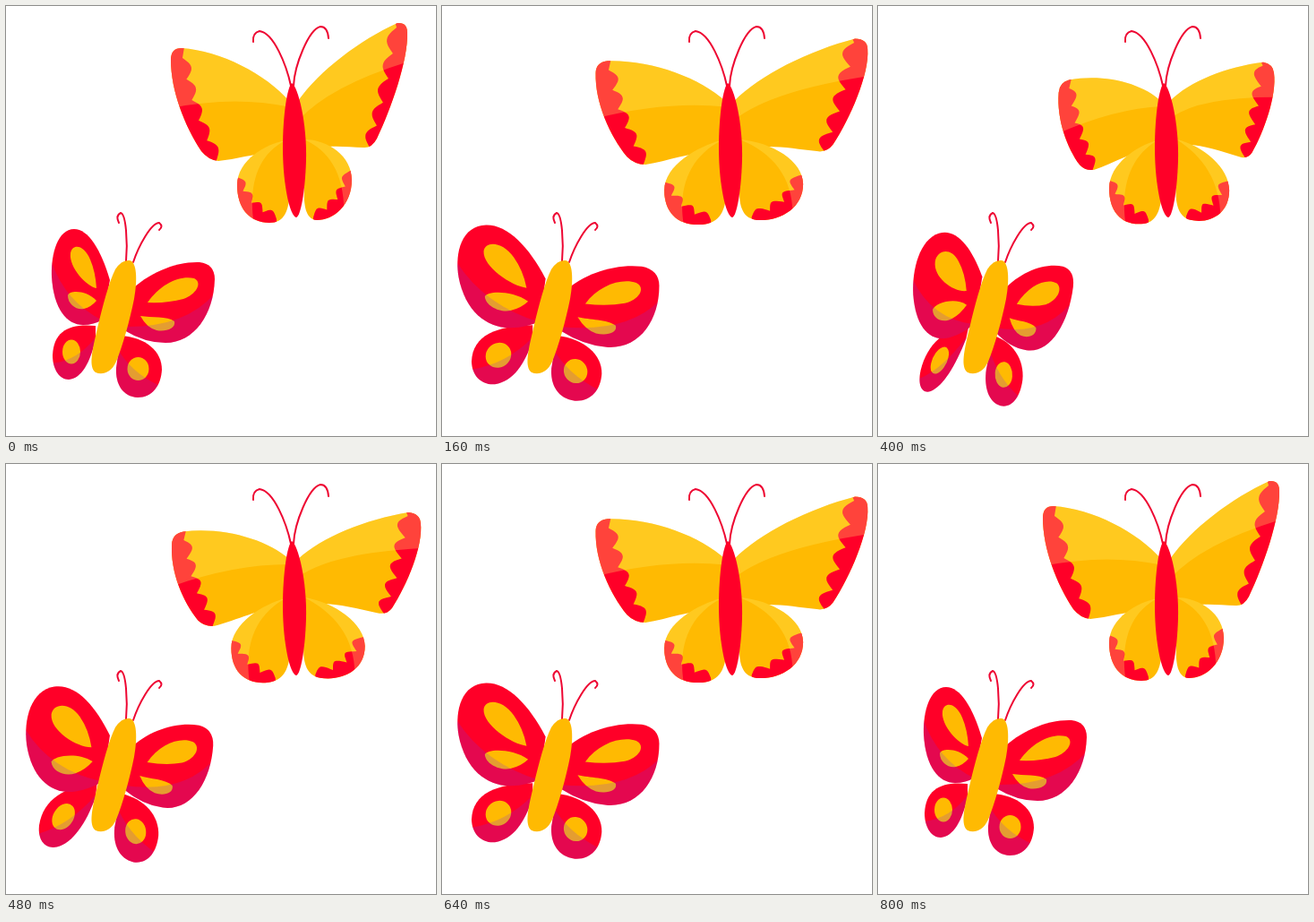
Write an HTML page with a canvas that moves like this. It is 480 px wide and 480 px high and loops after 0.84 s.

```html
<!DOCTYPE html>
<html lang="en">
<head>
<meta charset="utf-8">
<title>Butterflies</title>
<style>
  html, body { margin: 0; height: 100%; overflow: hidden; background: #fff; }
  canvas { display: block; }
</style>
</head>
<body>
<canvas id="stage" width="480" height="480"></canvas>
<script>
const ctx = document.getElementById('stage').getContext('2d');
const YELLOW = '#ffba02', RED = '#ff0028';
const LIGHT = 'rgba(255,240,110,.28)', SHADE = 'rgba(120,40,235,.2)';
const LOOP = 840, STEP = 40, TURN = 400;

// Row of rounded bumps along a quadratic curve; the sign of depth picks the side.
function scallops([x0, y0], [x1, y1], [x2, y2], count, depth) {
  const steps = count * 12;
  let path = '';
  for (let i = 0; i <= steps; i++) {
    const t = i / steps, s = 1 - t;
    const dx = s * (x1 - x0) + t * (x2 - x1), dy = s * (y1 - y0) + t * (y2 - y1);
    const out = depth * Math.abs(Math.sin(Math.PI * count * t)) / Math.hypot(dx, dy);
    const x = s * s * x0 + 2 * s * t * x1 + t * t * x2 + dy * out;
    const y = s * s * y0 + 2 * s * t * y1 + t * t * y2 - dx * out;
    path += `L${x.toFixed(1)} ${y.toFixed(1)}`;
  }
  return path;
}

const oval = (x, y, rx, ry) => `M${x - rx} ${y}a${rx} ${ry} 0 1 1 ${2 * rx} 0a${rx} ${ry} 0 1 1 ${-2 * rx} 0`;

// A wing deforms about its hinge. Both lists are changes to the matrix a, b, c, d:
// droop grows steadily to the turn, spread swells and fades on the way.
const wing = (color, hinge, droop, spread, outline, layers) => ({
  color, hinge, droop, spread,
  outline: new Path2D(outline),
  layers: layers.map(([fill, d]) => [fill, new Path2D(d)])
});

const wings = [
  wing(YELLOW, [315, 110], [-.11, -.23, -.065, -.13], [.155, 0, 0, 0],
    'M316 106C290 76 240 50 196 47Q184 47 184 60C184 95 200 135 218 162Q226 172 237 173C262 171 285 161 314 166Z',
    [[RED, 'M170 40H200' + scallops([197, 58], [206, 118], [235, 172], 5, 8) + 'V185H170Z'],
     [LIGHT, 'M170 117Q250 98 318 113V30H170Z']]),
  wing(YELLOW, [325, 105], [0, .26, .08, -.17], [.25, 0, 0, 0],
    'M326 106C350 72 395 38 437 19Q448 18 448 30C449 60 430 115 414 148Q408 159 399 158C375 157 350 153 328 166Z',
    [[RED, 'M460 10H432' + scallops([436, 24], [427, 98], [406, 158], 5, -9) + 'V175H460Z'],
     [LIGHT, 'M326 128Q363 87 460 59V10H326Z']]),
  wing(YELLOW, [312, 155], [0, -.07, 0, 0], [.19, -.08, 0, 0],
    'M312 150C290 154 258 172 258 200C258 226 272 242 294 242C310 242 316 230 317 205Z',
    [[RED, 'M250 188' + scallops([258, 191], [268, 225], [302, 238], 4, 7) + 'V250H250Z'],
     [LIGHT, 'M312 150C280 166 270 202 277 245H240V150Z']]),
  wing(YELLOW, [335, 155], [.12, .26, 0, -.04], [.3, 0, 0, 0],
    'M333 149C360 149 386 168 386 194C386 222 366 239 347 239C334 238 332 222 333 200Z',
    [[RED, 'M395 182' + scallops([384, 184], [377, 222], [343, 236], 4, -7) + 'V250H395Z'],
     [LIGHT, 'M333 149C362 162 380 190 377 240H400V140Z']]),

  wing(RED, [97, 365], [-.03, -.33, -.23, .08], [.46, 0, .11, 0],
    'M100 357C72 354 53 362 52 390C52 406 60 417 70 417C84 416 94 398 100 372Z',
    [[YELLOW, oval(73, 386, 10, 13.5)],
     [SHADE, 'M48 399Q78 398 100 370V425H48Z']]),
  wing(RED, [128, 372], [-.2, .18, -.1, .09], [.19, 0, .03, 0],
    'M128 368C156 370 174 385 174 406C173 424 163 437 147 437C130 436 122 422 123 404Z',
    [[YELLOW, oval(147.5, 405, 12, 13)],
     [SHADE, 'M122 378Q138 409 172 424V445H115Z']]),
  wing(RED, [112, 325], [.185, -.38, .018, .117], [.43, .12, .12, .03],
    'M116 306C106 272 92 249 76 249C58 249 50 276 51 302C53 338 68 356 86 356Q98 356 108 350Z',
    [[YELLOW, 'M101 315C90 313 70 292 72 276C74 265 87 266 94 283Q100 297 101 315Z'],
     [YELLOW, 'M101 329C90 317 71 317 69 323C69 333 79 340 87 338Q95 336 101 329Z'],
     [SHADE, 'M48 278Q64 330 108 351V365H45Z']]),
  wing(RED, [140, 335], [-.2, .12, -.115, .09], [.2, .04, .08, 0],
    'M138 319C158 298 190 285 216 286Q233 288 233 305C232 344 210 376 178 376Q155 376 132 362Z',
    [[YELLOW, 'M158 331C172 310 195 300 210 304C220 309 212 322 198 327Q180 332 158 331Z'],
     [YELLOW, 'M150 346C162 348 180 346 188 352C190 360 178 364 168 362Q157 359 150 346Z'],
     [SHADE, 'M240 312Q207 360 130 358V385H240Z']])
];

const redBody = new Path2D('M319 86C326 90 336 130 335 172C334 206 329 235 324 236C317 235 309 200 309 158C309 122 314 90 319 86Z');
const yellowBody = new Path2D('M138 284C146 285 147 306 143 327C138 352 130 380 123 397C117 410 107 412 100 409C92 403 96 385 102 360C108 334 115 308 122 294Q129 283 138 284Z');
const feelers = new Path2D(
  'M318 89C313 66 299 30 283 28Q275 30 276 40M321 89C322 66 338 26 351 23Q359 23 360 36' +
  'M134 285C136 264 134 232 128 231Q122 234 126 242M142 286C148 268 162 242 171 242Q176 246 171 250');

function drawWing({ color, hinge: [x, y], droop, spread, outline, layers }, u) {
  const swell = 4 * u * (1 - u);
  const matrix = [1, 0, 0, 1].map((v, i) => v + droop[i] * u + spread[i] * swell);
  ctx.save();
  ctx.translate(x, y);
  ctx.transform(...matrix, 0, 0);
  ctx.translate(-x, -y);
  ctx.fillStyle = color;
  ctx.fill(outline);
  ctx.clip(outline);
  for (const [fill, path] of layers) {
    ctx.fillStyle = fill;
    ctx.fill(path);
  }
  ctx.restore();
}

function draw(now) {
  const time = Math.floor(now % LOOP / STEP) * STEP;
  const u = 1 - Math.abs(time - TURN) / TURN;
  ctx.clearRect(0, 0, 480, 480);
  for (const w of wings) drawWing(w, u);
  ctx.strokeStyle = '#ee0632';
  ctx.lineWidth = 2;
  ctx.lineCap = 'round';
  ctx.stroke(feelers);
  ctx.fillStyle = RED;
  ctx.fill(redBody);
  ctx.fillStyle = YELLOW;
  ctx.fill(yellowBody);
}

const start = performance.now();
function loop() {
  draw(performance.now() - start);
  requestAnimationFrame(loop);
}
loop();
</script>
</body>
</html>
```
